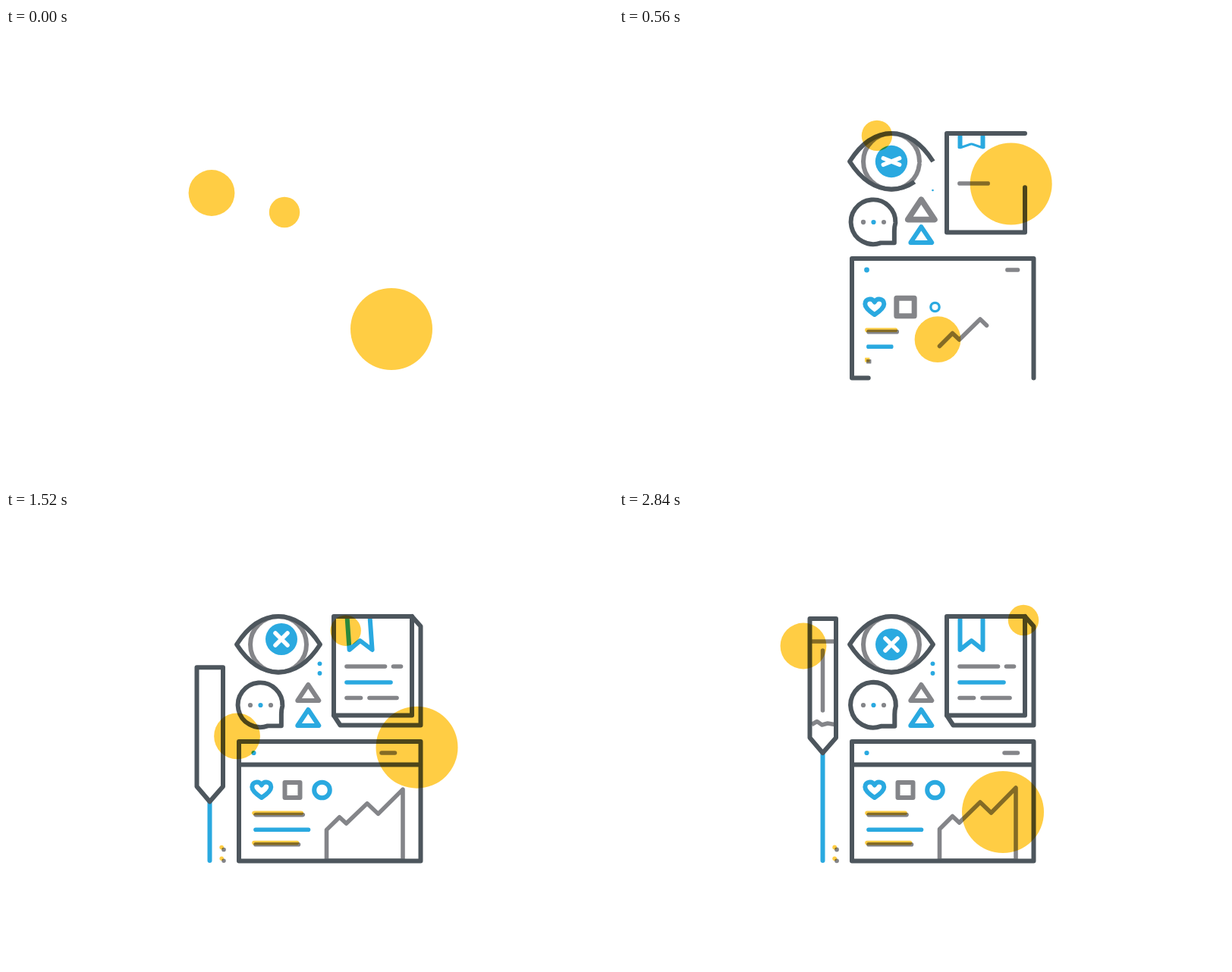
Recreate the animation shown at these times as an HTML page with a canvas. Size 800 by 600 pixels, loop 2.88 s.

```html
<!DOCTYPE html>
<html lang="en">
<head>
<meta charset="utf-8">
<title>Line icons</title>
<style>
  html, body { margin: 0; width: 100%; height: 100%; overflow: hidden; background: #fff; }
  canvas { display: block; }
</style>
</head>
<body>
<canvas id="stage" width="800" height="600"></canvas>
<script>
const ctx = document.getElementById('stage').getContext('2d');
const LOOP = 2880, STEP = 40;
const DARK = '#4d565d', GRAY = '#848589', BLUE = '#2aa9e0', YELLOW = '#ffcd44';
let t = 0;

const ease = (start, duration) => {
  const u = Math.min(1, Math.max(0, (t - start) / duration));
  return u * u * (3 - 2 * u);
};
// Springy scale from 0 to 1
const pop = start => {
  const u = t - start;
  return u <= 0 ? 0 : 1 - Math.exp(-u / 90) * Math.cos(2 * Math.PI * u / 260);
};
// Out and back once
const swing = (start, duration) => {
  const u = (t - start) / duration;
  return u > 0 && u < 1 ? Math.sin(Math.PI * u) ** 2 : 0;
};

const shapes = {};
function shape(d) {
  if (!shapes[d]) {
    const el = document.createElementNS('http://www.w3.org/2000/svg', 'path');
    el.setAttribute('d', d);
    shapes[d] = { path: new Path2D(d), length: el.getTotalLength() };
  }
  return shapes[d];
}

function stroke(d, color, part = 1, width = 6, cap = 'round') {
  if (part <= 0) return;
  const { path, length } = shape(d);
  ctx.strokeStyle = color;
  ctx.lineWidth = width;
  ctx.lineCap = cap;
  ctx.setLineDash(part < 1 ? [length * part, length * 2] : []);
  ctx.stroke(path);
  ctx.setLineDash([]);
}

function disc(x, y, r, color) {
  if (r <= 0) return;
  ctx.fillStyle = color;
  ctx.beginPath();
  ctx.arc(x, y, r, 0, 2 * Math.PI);
  ctx.fill();
}

function placed(x, y, sx, sy, draw) {
  if (!sx || !sy) return;
  ctx.save();
  ctx.translate(x, y);
  ctx.scale(sx, sy);
  draw();
  ctx.restore();
}

const icon = (x, y, start, d, color) => {
  const s = pop(start);
  placed(x, y, s, s, () => stroke(d, color));
};

// Rounded dash that stretches out from its outer edge
const dash = (x, y, length, color, grow, width = 5.6) =>
  placed(x, y, grow, 1, () => stroke(`M${Math.sign(length) * 3} 0h${length}`, color, 1, width));

function multiply(draw) {
  ctx.globalCompositeOperation = 'multiply';
  draw();
  ctx.globalCompositeOperation = 'source-over';
}

function eye() {
  stroke('M396 176A37 37 0 1 0 322 176A37 37 0 1 0 396 176Z', GRAY, ease(248, 340));
  stroke('M414 176C398 151 380 139 359 139C338 139 320 151 304 176C320 201 338 212.5 359 212.5C380 212.5 398 201 414 176Z',
    DARK, ease(283, 359), 6, 'butt');
  const look = ease(1160, 290) - ease(2240, 400);
  const s = pop(215);
  placed(359 + 4 * look, 176 - 7 * look, s, s, () => {
    disc(0, 0, 21, BLUE);
    const angle = (22 + 23 * ease(560, 220)) * Math.PI / 180;
    const x = 11.3 * Math.cos(angle), y = 11.3 * Math.sin(angle);
    ctx.strokeStyle = '#fff';
    ctx.lineWidth = 5.5;
    ctx.lineCap = 'round';
    ctx.beginPath();
    for (const side of [-1, 1]) {
      ctx.moveTo(-x, -y * side);
      ctx.lineTo(x, y * side);
    }
    ctx.stroke();
  });
  disc(413.5, 214, 2.9 * pop(530), BLUE);
  disc(413.5, 201.3, 2.9 * pop(600), BLUE);
}

function bubble() {
  const s = 1 + 0.016 * Math.cos(2 * Math.PI * (t - 1040) / 1600);
  placed(335.5, 256, s, s, () => {
    ctx.translate(-335.5, -256);
    stroke('M364.5 257A29.5 29.5 0 1 0 345 283.5H363V268Q363 262 364.5 257Z', DARK, ease(130, 310));
  });
  [322, 335.5, 349].forEach((x, i) =>
    disc(x, 256, 3.1 * pop(200 + 30 * i), i === 1 ? BLUE : GRAY));
}

function book() {
  ctx.save();
  ctx.beginPath();
  ctx.rect(436, 139, 96, 127);
  ctx.clip();
  ctx.translate(0, 139);
  ctx.transform(1, 0, 0.07 * swing(1200, 640), ease(460, 220), 0, 0);
  if (t > 460) stroke('M449.5 -6V44L464.5 32L479.5 44V-6', BLUE);
  ctx.restore();

  dash(446, 205, 50.5, GRAY, ease(355, 300));
  dash(507.5, 205, 10, GRAY, ease(600, 200));
  dash(446, 226, 58, BLUE, ease(580, 300));
  dash(446, 246.5, 18.5, GRAY, ease(640, 220));
  dash(476, 246.5, 36, GRAY, ease(760, 320));

  stroke('M535 139L546.5 152V282.5H440.5L432 269.5', DARK, ease(620, 380));
  stroke('M535 139H432V269.5H535Z', DARK, ease(206, 470));
}

function chart() {
  const wobble = t > 1120 && t < 2520 ? Math.sin(2 * Math.PI * (t - 1120) / 1400) : 0;
  placed(0, 461, 1, 1 - 0.022 * wobble, () =>
    stroke('M422.5 -41.5L439.5 -58.5L448.5 -50L476 -77L490.5 -63L523 -96V0H422.5Z',
      GRAY, ease(315, 790), 5.6));
}

function browser() {
  chart();
  stroke('M307 334.5H546', DARK, ease(600, 300));
  stroke('M546.5 461.5V304H307V461.5Z', DARK, ease(130, 656));

  disc(326.5, 319, 3.1 * pop(392), BLUE);
  dash(528.5 - 13 * swing(1200, 640), 319, -17.5, GRAY, ease(345, 290), 5.5);

  icon(336.8, 368, 365,
    'M0 10C-3 8 -12.5 2 -12.5 -4C-12.5 -11.5 -3 -12.5 0 -6.5C3 -12.5 12.5 -11.5 12.5 -4C12.5 2 3 8 0 10Z', BLUE);
  icon(377.5, 368, 410, 'M-10 -10H10V10H-10Z', GRAY);
  icon(416.5, 368, 525, 'M10.3 0A10.3 10.3 0 1 0 -10.3 0A10.3 10.3 0 1 0 10.3 0Z', BLUE);

  const firstLine = ease(360, 290) * (1 + 0.22 * swing(1200, 640));
  dash(324, 398.3, 50, YELLOW, firstLine);
  dash(324, 437.6, 56.5, YELLOW, ease(500, 300));
  multiply(() => {
    dash(326, 400.6, 50, GRAY, firstLine);
    dash(326, 439.8, 56.5, GRAY, ease(500, 300));
  });
  dash(326, 420.3, 69.5, BLUE, ease(430, 270));
}

function pencil() {
  const drop = 169 * (1 - ease(1160, 620));
  const tip = 319.5 + drop;
  if (tip < 461) stroke(`M268.5 461V${tip.toFixed(1)}`, BLUE);
  placed(0, drop, 1, 1, () => {
    stroke('M254 172H283', GRAY, ease(1740, 180), 5.5, 'butt');
    stroke('M268.5 184V263', GRAY, ease(1800, 240), 5.5);
    stroke('M254 281.5L261 277.5L267.5 282L275 280L284 281.5', GRAY, ease(1840, 240), 5.5, 'butt');
    stroke('M268.5 319L251.5 299V142H286V299Z', DARK, ease(1050, 300));
  });
  [446.5, 461.3].forEach((y, i) => {
    const r = 2.9 * pop(1220 + 70 * i);
    disc(284.2, y - 3, r, YELLOW);
    multiply(() => disc(287, y, r, GRAY));
  });
}

// Point on a Bézier curve of any degree
function along(points, s) {
  while (points.length > 1) {
    points = points.slice(1).map(([x, y], i) =>
      [points[i][0] + (x - points[i][0]) * s, points[i][1] + (y - points[i][1]) * s]);
  }
  return points[0];
}

const balls = [
  { r: 54, first: [[508, 397], [423, 286], [536, 187]], second: [[536, 187], [572, 281], [506, 397]] },
  { r: 30.4, first: [[271, 217.5], [272, 385], [452, 418]], second: [[452, 418], [309, 356], [243, 178]] },
  { r: 20.2, first: [[367, 243], [387, 227], [390, 126], [323, 144]], second: [[323, 144], [417, 173], [533, 144]] }
];

function draw() {
  ctx.fillStyle = '#fff';
  ctx.fillRect(0, 0, 800, 600);
  ctx.lineJoin = 'round';
  eye();
  bubble();
  icon(398.3, 240, 450, 'M0 -11L14 10H-14Z', GRAY);
  icon(398.3, 273, 363, 'M0 -11L14 10H-14Z', BLUE);
  book();
  browser();
  pencil();
  multiply(() => {
    for (const { r, first, second } of balls) {
      const [x, y] = t < 1120 ? along(first, ease(0, 690)) : along(second, ease(1120, 690));
      disc(x, y, r, YELLOW);
    }
  });
}

const begin = performance.now();
function tick() {
  const elapsed = (performance.now() - begin) % LOOP;
  t = Math.floor(elapsed / STEP) * STEP;
  draw();
  requestAnimationFrame(tick);
}
tick();
</script>
</body>
</html>
```
